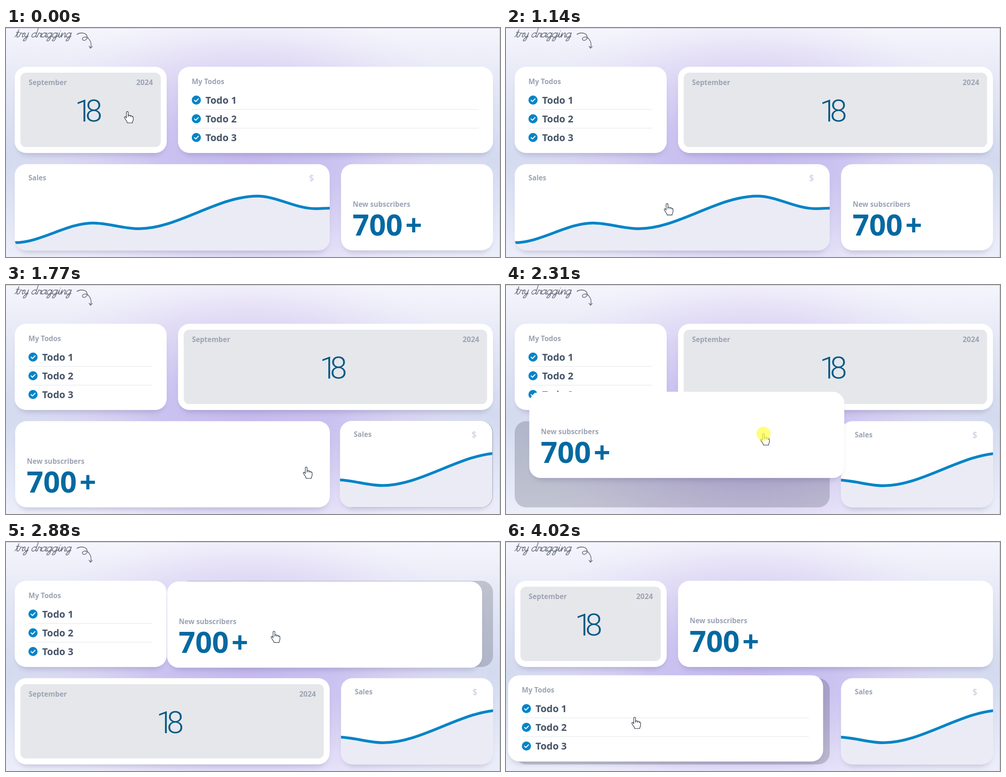
An HTML page for the animation above (4090 ms loop, 1079 by 502 pixels).

```html
<!DOCTYPE html>
<html lang="en">
<head>
<meta charset="utf-8">
<title>Draggable dashboard</title>
<style>
  html, body { margin: 0; width: 100%; height: 100%; overflow: hidden; background: #eef0f9; }
  svg { display: block; width: 100vw; height: 100vh; }
  text { font-family: "Open Sans", "Noto Sans", sans-serif; font-weight: 700; }
  .label { font-size: 15.3px; fill: #9ca3b4; }
  .year { font-size: 16px; text-anchor: end; }
  .todo { font-size: 21.2px; fill: #475569; }
  .count { font-size: 64px; fill: #0369a1; }
  .day { font: 300 67px Roboto, "Open Sans", sans-serif; letter-spacing: -14.5px; fill: #075985; }
  .coin { font-size: 19px; font-weight: 600; fill: #cdd1e2; text-anchor: middle; }
  .ink { fill: none; stroke: #6b7280; stroke-width: 1.6; stroke-linecap: round; stroke-linejoin: round; }
</style>
</head>
<body>
<svg id="stage" viewBox="0 0 1079 502" preserveAspectRatio="none">
  <defs>
    <linearGradient id="sky" x1="0" y1="0" x2="0" y2="1">
      <stop offset="0" stop-color="#f5f5fc"/>
      <stop offset=".25" stop-color="#e4e7f5"/>
      <stop offset=".57" stop-color="#d3daef"/>
      <stop offset="1" stop-color="#eceefa"/>
    </linearGradient>
    <radialGradient id="glow" gradientUnits="userSpaceOnUse" cx="0" cy="0" r="1"
      gradientTransform="translate(530 285) scale(530 330)">
      <stop offset="0" stop-color="#c5b9ee"/>
      <stop offset=".35" stop-color="#c9bff0" stop-opacity=".9"/>
      <stop offset=".7" stop-color="#dcd0f4" stop-opacity=".5"/>
      <stop offset="1" stop-color="#ece4fa" stop-opacity="0"/>
    </radialGradient>
    <filter id="soft" x="-10%" y="-20%" width="120%" height="150%">
      <feGaussianBlur stdDeviation="6"/>
    </filter>
    <clipPath id="chartClip"><rect id="chartBox" height="189" rx="25"/></clipPath>
  </defs>
  <rect width="1079" height="502" fill="url(#sky)"/>
  <rect width="1079" height="502" fill="url(#glow)"/>
  <path d="M0 .5H1078.5V502" fill="none" stroke="#bfc0cc"/>
  <g id="hint" class="ink" role="img" aria-label="try dragging"></g>
  <path class="ink" d="M155 14C162 9 175 10 177 18C179 26 169 30 167 25C165 20 176 17 181 24C186 30 187 37 184.5 44m-3-4l3 4.500l4-4"/>
  <g id="slots"></g>
  <g id="cards"></g>
  <g id="cursor">
    <path d="M-2 2C-2-.6 2-.6 2 2V9C4 7.500 6 8 6.400 9.500C8 8.600 10 9.200 10.300 10.800C12 10.300 13 11.400 13 13V18C13 20 11 22 11 25H0C0 22-2 21-3.500 18L-6 14C-7 12-5 10.500-3.500 12L-2 14Z"
      fill="#fff" stroke="#14202c" stroke-width="1.100"/>
    <path d="M2 9v3M6.400 9.500v3M10.300 10.800v2" stroke="#14202c" fill="none"/>
    <circle id="press" r="15.500" fill="#ffff50" opacity=".75"/>
  </g>
</svg>
<script>
const LOOP = 4090, SWAP = 350, SETTLE = 330, FADE = 280, SHADE = .19;
const HIGH = 189, NARROW = 332, WIDE = 688, LEFT = 19, GAP = 24.7, TOP = 85, LOW = 298.5;
const $ = id => document.getElementById(id);

const SLOTS = {
  A: { x: LEFT, y: TOP, w: NARROW },
  B: { x: LEFT + NARROW + GAP, y: TOP, w: WIDE },
  C: { x: LEFT, y: LOW, w: WIDE },
  D: { x: LEFT + WIDE + GAP, y: LOW, w: NARROW }
};
const START = { date: 'A', todos: 'B', sales: 'C', subs: 'D' };

// A card is pressed, trades slots with another, is dropped and settles.
const DRAGS = [
  { card: 'date', other: 'todos', press: 70, swap: 172, drop: 480 },
  { card: 'sales', other: 'subs', press: 1180, swap: 1460, drop: 1567 },
  { card: 'subs', other: 'date', press: 2000, swap: 2504, drop: 2720 },
  { card: 'todos', other: 'date', press: 3350, swap: 3630, drop: 3820 }
];

// The few turning points of the hand: time, x, y.
const HAND = [
  [0, 265, 183], [70, 265, 186], [340, 655, 200], [480, 700, 200], [900, 400, 428],
  [1140, 352, 385], [1180, 352, 385], [1460, 735, 380], [1567, 670, 377], [1770, 656, 399],
  [2000, 530.5, 390.5], [2180, 510, 380], [2590, 699, 197], [2720, 710, 189],
  [3350, 185, 222], [3480, 189, 234], [3820, 300, 330], [4020, 281, 384]
];

const clamp = v => Math.max(0, Math.min(1, v));
const mix = (a, b, p) => a + (b - a) * p;
const easeOut = u => 1 - (1 - clamp(u)) ** 3;
const smooth = u => { u = clamp(u); return u * u * (3 - 2 * u); };

// Smooth motion through the turning points.
function handAt(t) {
  const key = i => HAND[Math.max(0, Math.min(HAND.length - 1, i))];
  const slope = (i, k) => (key(i + 1)[k] - key(i - 1)[k]) / (key(i + 1)[0] - key(i - 1)[0]);
  let i = 0;
  while (i < HAND.length - 2 && key(i + 1)[0] <= t) i++;
  const a = key(i), b = key(i + 1), span = b[0] - a[0], u = clamp((t - a[0]) / span), v = 1 - u;
  const at = k => mix(a[k], b[k], smooth(u)) + span * u * v * (v * slope(i, k) - u * slope(i + 1, k));
  return { x: at(1), y: at(2) };
}

function writeHint() {
  const bowl = 'M9-8C6-12 0-9 0-4C0 1 6 1 9-5', foot = 'L9-4C9 0 11 1 13-2';
  const tail = 'L10-10C9 0 9 8 4 8C1 8 2 4 6 1L11-2', lead = 'M0-2C1-5 2-8 2-10';
  const glyphs = {
    t: ['M0-1C2-3 4-10 5-17L4-5C4 0 6 1 9-2M1-11H8', 9],
    r: [lead + 'C4-8 7-9 8-9C7-5 6 0 9-1L10-2', 9],
    y: ['M0-8C1-11 3-10 3-7C2-1 6 1 9-4' + tail, 10],
    d: [bowl + 'L10-20' + foot, 12],
    a: [bowl + 'L10-10' + foot, 12],
    g: [bowl + tail, 12],
    i: [lead + 'L2-3C2 0 4 1 6-2M3-14v.5', 6],
    n: [lead + 'L2 0C3-6 7-12 9-9C10-6 8 0 10 0L12-2', 12],
    ' ': ['', 8.5]
  };
  let x = 19;
  $('hint').innerHTML = [...'try dragging'].map(ch => {
    const [d, step] = glyphs[ch];
    const mark = `<path d="${d}" transform="translate(${x} 20.5) skewX(-14)"/>`;
    x += step;
    return mark;
  }).join('');
}

// data-w: width less a margin, data-r: offset from the right edge, data-c: offset from the centre
const face = `<rect data-w="10" x="5" y="13" height="${HIGH - 8}" rx="24" fill="#3b3566" opacity=".2" filter="url(#soft)"/>
  <rect data-w="0" height="${HIGH}" rx="25" fill="#fff"/>`;

const todoRow = n => {
  const y = 32 + 41 * n;
  return `<circle cx="40" cy="${y}" r="10" fill="#0284c7"/>
    <path d="M35.800 ${y + .3}l3 3l5.600-6" fill="none" stroke="#fff" stroke-width="2" stroke-linecap="round" stroke-linejoin="round"/>
    <text class="todo" x="60" y="${y + 7.7}">Todo ${n}</text>
    ${n < 3 ? `<rect data-w="61" x="30" y="${y + 20}" height="1" fill="#e2e4ea"/>` : ''}`;
};

// Hills and valleys of the chart, level at each.
const wave = [[0, 172], [171, 129], [270, 141.5], [530, 70], [656, 97.5], [688, 96.5]]
  .map(([x, y]) => [x - WIDE / 2, y])
  .reduce((d, [x, y], i, all) => {
    if (!i) return `M${x} ${y}`;
    const [px, py] = all[i - 1];
    return d + `C${mix(px, x, 1 / 3)} ${py} ${mix(px, x, 2 / 3)} ${y} ${x} ${y}`;
  }, '');

const BODY = {
  date: `<rect data-w="25.5" x="12.500" y="13" height="163" rx="12" fill="#e5e7eb"/>
    <text class="label" x="30.500" y="40">September</text>
    <g data-r="30"><text class="label year" y="40">2024</text></g>
    <g data-c="-34.5"><text class="day" y="120">18</text></g>`,
  todos: `<text class="label" x="30" y="37.500">My Todos</text>` + [1, 2, 3].map(todoRow).join(''),
  sales: `<g clip-path="url(#chartClip)"><g data-c="0">
      <path d="${wave}V${HIGH}H${-WIDE / 2}Z" fill="#ebebf5"/>
      <path d="${wave}" fill="none" stroke="#0284c7" stroke-width="6"/>
    </g></g>
    <text class="label" x="30" y="35">Sales</text>
    <g data-r="39.5"><text class="coin" y="37">$</text></g>`,
  subs: `<text class="label" x="25.500" y="93">New subscribers</text>
    <text class="count" x="25" y="156">700<tspan dx="6">+</tspan></text>`
};

function place(id, { x, y, w }) {
  const g = $(id);
  g.setAttribute('transform', `translate(${x} ${y})`);
  g.querySelectorAll('[data-w]').forEach(e => e.setAttribute('width', w - e.dataset.w));
  g.querySelectorAll('[data-r]').forEach(e => e.setAttribute('transform', `translate(${w - e.dataset.r} 0)`));
  g.querySelectorAll('[data-c]').forEach(e => e.setAttribute('transform', `translate(${w / 2 + +e.dataset.c} 0)`));
  if (id === 'sales') $('chartBox').setAttribute('width', w);
}

const blend = (a, b, p) => ({ x: mix(a.x, b.x, p), y: mix(a.y, b.y, p), w: mix(a.w, b.w, p) });

function layout(t) {
  const home = { ...START }, pose = {}, shade = {};
  let top = null, held = false;
  for (const k in home) pose[k] = SLOTS[home[k]];
  for (const { card, other, press, swap, drop } of DRAGS) {
    if (t < press) break;
    const source = home[card], goal = home[other], from = SLOTS[source], to = SLOTS[goal];
    const p = easeOut((t - swap) / SWAP), fade = smooth((t - swap) / FADE);
    const grab = handAt(press), hand = handAt(Math.min(t, drop));
    // A card that grows moves back under the hand.
    const shift = (to.w - from.w) * (1 - (1 - p) ** 2);
    const w = mix(from.w, to.w, p);
    const carried = { x: from.x + hand.x - grab.x - shift, y: from.y + hand.y - grab.y, w };
    pose[card] = { ...blend(carried, to, easeOut((t - drop) / SETTLE)), w };
    pose[other] = blend(to, from, p);
    if (t >= swap) [home[card], home[other]] = [goal, source];
    if (t < drop + SETTLE) {
      shade[source] = SHADE * (1 - fade);
      shade[goal] = SHADE * fade;
    }
    held = t < drop;
    top = card;
  }
  const order = Object.keys(home).sort((a, b) =>
    (a === top) - (b === top) || home[a].localeCompare(home[b]));
  return { pose, shade, held, order };
}

let stacked = '';
function draw(t) {
  const { pose, shade, held, order } = layout(t);
  for (const id in pose) place(id, pose[id]);
  for (const k in SLOTS) $('slot' + k).setAttribute('opacity', shade[k] || 0);
  if (stacked !== order.join()) {
    order.forEach(id => $('cards').append($(id)));
    stacked = order.join();
  }
  const { x, y } = handAt(t);
  $('cursor').setAttribute('transform', `translate(${x} ${y})`);
  $('press').setAttribute('visibility', held ? 'visible' : 'hidden');
}

writeHint();
$('slots').innerHTML = Object.entries(SLOTS).map(([k, s]) =>
  `<rect id="slot${k}" x="${s.x}" y="${s.y}" width="${s.w}" height="${HIGH}" rx="25" fill="#0b1020"/>`).join('');
$('cards').innerHTML = Object.keys(BODY).map(id => `<g id="${id}">${face}${BODY[id]}</g>`).join('');

const began = performance.now();
function frame() {
  draw((performance.now() - began) % LOOP);
  requestAnimationFrame(frame);
}
frame();
</script>
</body>
</html>
```
